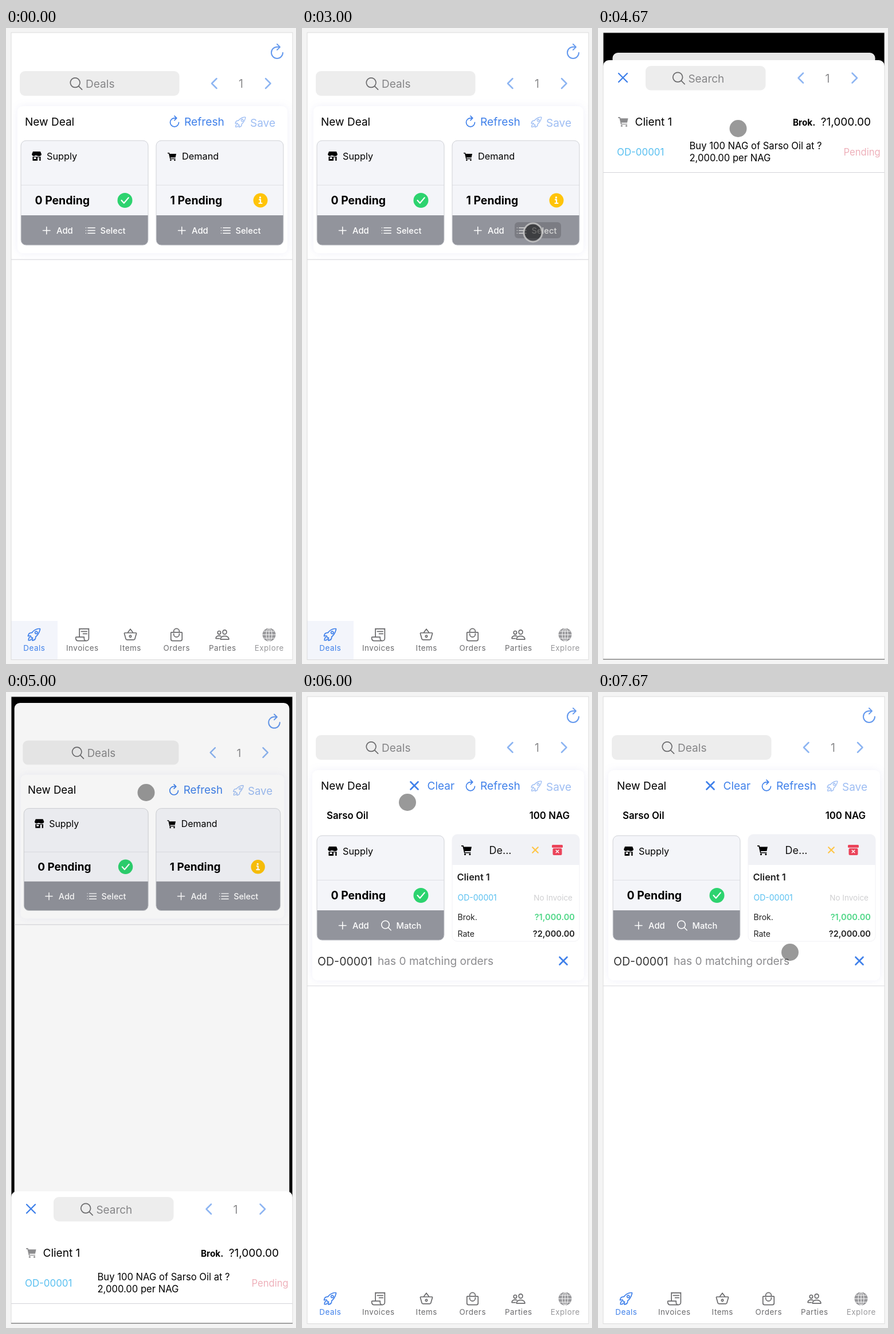
An HTML page that plays this animation: 506x1107 px, repeating every 8000 ms.

```html
<!DOCTYPE html>
<html lang="en">
<head>
<meta charset="utf-8">
<title>Deals</title>
<style>
html, body { margin: 0; width: 100%; height: 100%; overflow: hidden; background: #f4f4f4; }
svg { display: block; width: 506px; height: 1107px; font-family: Inter, sans-serif; }
.ic { fill: none; stroke-width: 32; stroke-linecap: round; stroke-linejoin: round; }
.card { filter: drop-shadow(0 0 7px rgba(90, 90, 190, .09)); }
</style>
</head>
<body>
<svg id="stage" viewBox="0 0 506 1107"></svg>
<script>
const BLUE = '#3f80ea', PALE = '#9dbdf3', GREY = '#6b6b6d', BODY = '#f4f5f9', BAR = '#92949c';

// Line icons on a 512 unit grid
const ICONS = {
  reload: 'M320 146s24-12-64-12a160 160 0 1 0 160 160M256 58l80 80-80 80',
  search: 'M221 64a157 157 0 1 0 .1 0zM338 338L448 448',
  list: 'M160 144h288M160 256h288M160 368h288M80 144h1M80 256h1M80 368h1',
  rocket: 'M462 54c-60-20-190 30-252 99q-18 18-33 39c-80-8-116 40-129 112l91-8q0 22 7 30l31 31q8 7 29 6l-9 91c80-12 122-50 113-129q21-14 39-33c68-68 115-191 113-238zM329 141a42 42 0 1 0 .1 0zM110 352q-26 4-35 24t-11 72q52-2 72-11t24-35',
  receipt: 'M160 336V48l32 16 32-16 32 16 32-16 32 16 32-16 32 16 32-16 32 16 32-16v336a80 80 0 0 1-160 0v-48H48q-16 0-16 16c0 64 7 112 80 112h288M224 144h192M288 224h128',
  basket: 'M68 192a20 20 0 0 0-19 26l51 182a41 41 0 0 0 39 30h233a41 41 0 0 0 39-30l52-182a20 20 0 0 0-19-26zM160 192l96-128 96 128M256 277a34 34 0 1 0 .1 0z',
  bag: 'M80 176a16 16 0 0 0-16 16v216a56 56 0 0 0 56 56h272a56 56 0 0 0 56-56V192a16 16 0 0 0-16-16zM160 176v-32a96 96 0 0 1 192 0v32M160 224v16a96 96 0 0 0 192 0v-16',
  people: 'M402 168c-3 40-33 72-66 72s-63-32-66-72c-3-42 26-72 66-72s69 31 66 72zM336 304c-65 0-128 32-144 96q-1 16 12 16h264q13 0 12-16c-16-65-79-96-144-96zM200 185c-3 32-27 58-53 58s-50-26-53-58c-2-33 21-57 53-57s55 25 53 57zM206 306q-27-11-59-11c-52 0-103 26-115 77q0 13 9 13h111'
};

const icon = (name, x, y, size, color, width = 32) =>
  `<path class="ic" d="${ICONS[name]}" stroke="${color}" style="stroke-width:${width}" transform="translate(${x} ${y}) scale(${size / 512})"/>`;
const text = (x, y, size, str, color = '#000', weight = 400, anchor = 'start', extra = '') =>
  `<text x="${x}" y="${y}" font-size="${size}" fill="${color}" font-weight="${weight}" text-anchor="${anchor}" ${extra}>${str}</text>`;
const rect = (x, y, w, h, fill, r = 0, extra = '') =>
  `<rect x="${x}" y="${y}" width="${w}" height="${h}" rx="${r}" fill="${fill}" ${extra}/>`;
const line = (d, color, width) =>
  `<path d="${d}" fill="none" stroke="${color}" stroke-width="${width}" stroke-linecap="round" stroke-linejoin="round"/>`;
const dot = (x, y, r, fill) => `<circle cx="${x}" cy="${y}" r="${r}" fill="${fill}"/>`;
const cross = (x, y, h, color, width) =>
  line(`M${x - h} ${y - h}l${2 * h} ${2 * h}m0 ${-2 * h}l${-2 * h} ${2 * h}`, color, width);
const cart = (x, y, scale, color) => `<g fill="${color}" transform="translate(${x} ${y}) scale(${scale})">
  <path d="M0 0H3L3.6 2H15L13.6 8.4H5L5.4 10H13.6V11.2H4.2L2 1.4H0z"/>${dot(5.4, 13, 1.3, color)}${dot(12.4, 13, 1.3, color)}</g>`;
const store = (x, y) => `<g transform="translate(${x} ${y})">
  <path d="M2 0H15L17 5Q16 8 13 8T8.5 7 4 8Q1 8 0 5zM1.5 9H15.5V16H1.5z"/>${rect(3.6, 10, 4, 3, BODY)}${rect(10, 10, 3.2, 6, BODY)}</g>`;
const pager = (x, y) => line(`M${x - 42.5} ${y - 8.5}l-8.5 8.5 8.5 8.5M${x + 43} ${y - 8.5}l8.5 8.5-8.5 8.5`, '#8db5f2', 2.5) +
  text(x, y + 7.5, 19.5, '1', '#8a8a8c', 400, 'middle');

const okBadge = (x, y) => dot(x, y, 13, '#2dd36f') + line(`M${x - 6} ${y}l4.3 4.8 8-9.4`, '#fff', 2.2);
const infoBadge = (x, y) => dot(x, y, 12.5, '#ffc409') + dot(x - .5, y - 5, 1.7, '#fff') +
  line(`M${x - 2} ${y - 1.3}h2v6.3m-2.5 0h5`, '#fff', 2.2);

function panel(x, y, mark, title, count, badge, action, actionIcon) {
  return rect(x, y, 222, 182, BODY, 9) +
    `<path d="M${x} ${y + 130}h222v43a9 9 0 0 1-9 9h-204a9 9 0 0 1-9-9z" fill="${BAR}"/>` +
    rect(x, y + 77, 222, 1, '#dfe0e5') +
    rect(x, y, 222, 182, 'none', 9, 'stroke="#cfd1d6"') +
    mark + text(x + 45, y + 33, 16.3, title) +
    text(x + 24.5, y + 111, 19.4, count + ' Pending', '#000', 700) + badge +
    line(`M${x + 38.5} ${y + 156.5}h12.5m-6.25-6.25v12.5`, '#fff', 1.5) +
    text(x + 62, y + 162, 14.8, 'Add', '#fff', 500) +
    icon(actionIcon, x + 110, y + 145.5, 22, '#fff', 34) +
    text(x + 138.5, y + 162, 14.7, action, '#fff', 500);
}
const supply = (y, action, actionIcon) =>
  panel(26, y, store(45, y + 19), 'Supply', 0, okBadge(207.5, y + 104), action, actionIcon);

const dealHeader = text(33, 169.5, 19, 'New Deal') +
  icon('reload', 282, 150.5, 24, BLUE, 36) + text(311, 170, 19.2, 'Refresh', BLUE) +
  icon('rocket', 398, 153, 22, PALE) + text(426, 172, 19, 'Save', PALE);

const emptyDeal = rect(20, 136, 471, 256, '#fff', 9, 'class="card"') + dealHeader +
  supply(196, 'Select', 'list') +
  panel(262, 196, cart(282, 217, 1, '#000'), 'Demand', 1, infoBadge(444, 300), 'Select', 'list') +
  rect(9, 402.5, 491, 1, '#d3d3d8') +
  rect(371, 338, 81, 28, 'rgba(0,0,0,.16)', 6, 'id="press"');

const filledDeal = rect(18, 136, 474, 366, '#fff', 9, 'class="card"') + dealHeader +
  cross(196, 163, 6.5, BLUE, 2.7) + text(218.5, 170, 19, 'Clear', BLUE) +
  text(43, 221, 16.8, 'Sarso Oil', '#000', 600) + text(467, 221, 16.8, '100 NAG', '#000', 600, 'end') +
  supply(250, 'Match', 'search') +
  rect(262, 248, 222, 186, '#fff', 9, 'stroke="#f1f1f5"') +
  `<path d="M262 301v-44a9 9 0 0 1 9-9h204a9 9 0 0 1 9 9v44z" fill="#f1f2f6"/>` +
  cart(278, 267, 1.2, '#000') + text(326.5, 282, 18, 'De...', '#111') +
  cross(407, 275, 4.8, '#ffc648', 2.2) +
  rect(436, 266, 19, 5, '#eb445a', 1.5) + rect(437.5, 272, 16, 12, '#eb445a', 2) + cross(445.5, 277.5, 2.3, '#fff', 1.5) +
  text(270.5, 328, 16.4, 'Client 1', '#222', 600) +
  text(271.5, 363, 14, 'OD-00001', '#57bff0') + text(472, 363, 13.5, 'No Invoice', '#cfcfd1', 400, 'end') +
  text(271.5, 396.5, 14, 'Brok.', '#222') + text(476, 396.5, 14.6, '?1,000.00', '#4fd787', 600, 'end') +
  text(271.5, 425.5, 14, 'Rate', '#222') + text(476, 425.5, 14.6, '?2,000.00', '#222', 600, 'end') +
  rect(9, 511, 491, 1, '#dcdce0') +
  `<g id="matches">${text(27, 475.5, 19.6, 'OD-00001', '#333')}${text(132, 475, 19.1, 'has 0 matching orders', '#8b8b8e')}${cross(456, 468, 6.5, BLUE, 2.7)}</g>`;

const tabs = [['Deals', 49, 'rocket'], ['Invoices', 133, 'receipt'], ['Items', 217, 'basket'],
  ['Orders', 297.5, 'bag'], ['Parties', 377.5, 'people'], ['Explore', 459]];
const tabBar = rect(9, 1032, 81, 67, '#f3f5fb', 0, 'id="tabBg"') + tabs.map(([name, x, glyph], i) => {
  const color = i == 0 ? BLUE : glyph ? GREY : '#98989b';
  const mark = glyph ? icon(glyph, x - 13, 1043, 26, color, 34) : dot(x, 1056, 11.5, color) +
    `<ellipse cx="${x}" cy="1056" rx="5" ry="11.5" fill="none" stroke="#fff"/>` +
    line(`M${x} 1044.5v23M${x - 11.5} 1056h23M${x - 9} 1050h18M${x - 9} 1062h18`, '#fff', 1);
  return mark + text(x + .3, 1084, 13.4, name, color, 400, 'middle', 'letter-spacing=".55"');
}).join('');

const page = rect(9, 8, 491, 1091, '#fff', 0, 'id="sheet"') +
  icon('reload', 457, 24.5, 32, '#6499ee') +
  rect(24, 75, 278.5, 43, '#ededed', 9) + icon('search', 109, 83.5, 27, GREY) +
  text(139, 104, 19.1, 'Deals', '#858587') + pager(410, 96.5) +
  `<g id="empty">${emptyDeal}</g><g id="filled">${filledDeal}</g>` + tabBar +
  rect(9, 8, 491, 1091, '#000', 0, 'id="dim"');

const modal = `<path d="M9 1099V66a10 10 0 0 1 10-10h471a10 10 0 0 1 10 10v1033z" fill="#fff"/>` +
  cross(43.5, 86.5, 7.5, BLUE, 2.3) +
  rect(83, 66, 209.5, 42.5, '#ededed', 9) + icon('search', 127.5, 74, 27, GREY) +
  text(157.5, 95, 18.9, 'Search', '#858587') + pager(400.5, 87) +
  cart(35, 155, 1.17, '#8c8c8e') + text(64.5, 170, 19, 'Client 1') +
  text(340, 170, 15.3, 'Brok.', '#000', 700) + text(476, 170, 19.1, '?1,000.00', '#000', 400, 'end') +
  text(33, 221.5, 16.9, 'OD-00001', '#57bff0') +
  text(159.5, 211, 16.6, 'Buy 100 NAG of Sarso Oil at ?') + text(159.5, 232, 16.6, '2,000.00 per NAG') +
  text(428.5, 221.5, 16.6, 'Pending', '#eeb0ba') +
  rect(9, 251, 491, 1, '#d3d3d8');

document.getElementById('stage').innerHTML =
  `<clipPath id="frame">${rect(9, 8, 491, 1091, '#000')}</clipPath>
  <g clip-path="url(#frame)">${rect(9, 8, 491, 1091, '#000')}<g id="page">${page}</g><g id="modal">${modal}</g></g>` +
  rect(9, 8, 491, 1091.5, 'none', 0, 'stroke="#dcdcdc"') +
  rect(9, 1098, 491, 1.3, '#808080', 0, 'id="edge"') +
  '<circle id="cursor"/>';

const el = id => document.getElementById(id);
const show = (id, on) => el(id).style.display = on ? '' : 'none';
const set = (id, attrs) => Object.entries(attrs).forEach(([k, v]) => el(id).setAttribute(k, v));
const latest = (list, t) => list.findLast(row => row[0] <= t);

// time, x, y, radius
const CURSOR = [
  [0, 0, 0, 0], [670, 466, 287, 12], [1000, 438, 299, 12], [1330, 425, 320, 11], [1670, 403, 354, 12],
  [2000, 403, 355, 12], [3000, 403, 356, 16], [3670, 403, 356, 15], [4000, 340, 225, 15], [4330, 274, 175, 15],
  [4670, 244.5, 175, 15], [5670, 240, 176, 15], [6000, 184, 192, 15], [6330, 161, 258, 15], [6670, 182, 382, 15],
  [7000, 220, 389, 15], [7330, 193, 469, 15], [7670, 335, 453, 15]
];
// time, modal top, page top, page scale, dimming
const SHEET = [
  [0, 1107, 8, 1, 0], [3670, 82.5, 43, .933, .085], [4000, 57, 43, .933, .085], [4330, 56, 43, .933, .085],
  [5000, 869, 19, .977, .04], [5330, 1107, 8, 1, 0]
];

function draw(now) {
  const t = now % 8000;
  const [, top, pageTop, scale, dim] = latest(SHEET, t);
  set('modal', { transform: `translate(0 ${top - 56})` });
  set('page', { transform: `translate(254.5 ${pageTop}) scale(${scale}) translate(-254.5 -8)` });
  set('sheet', { rx: scale < 1 ? 10 : 0 });
  set('dim', { opacity: dim, rx: scale < 1 ? 10 : 0 });

  const [, x, y, r] = latest(CURSOR, t), pressed = t >= 3000 && t < 3670;
  set('cursor', {
    cx: x, cy: y, r, fill: `rgba(0,0,0,${pressed ? .5 : .4})`,
    stroke: pressed ? 'rgba(200,200,200,.85)' : 'none', 'stroke-width': 3
  });
  show('press', pressed);
  show('empty', t < 5670);
  show('filled', t >= 5670);
  show('matches', t >= 6000);
  show('tabBg', t < 5000);
  show('edge', t >= 4000 && t < 5670);
  requestAnimationFrame(draw);
}
requestAnimationFrame(draw);
</script>
</body>
</html>
```
